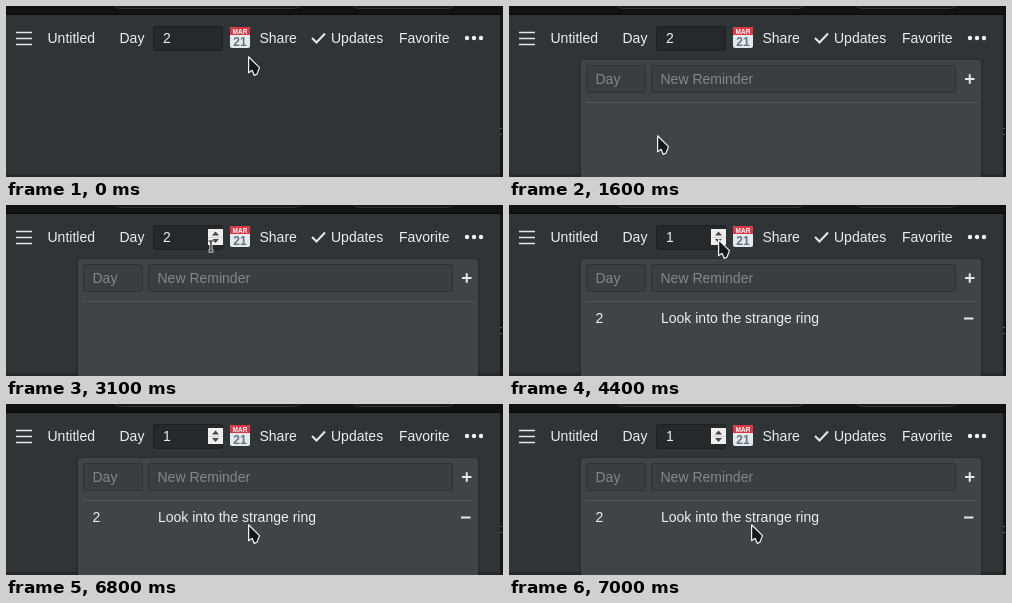
Write an HTML page that moves like this. It is 497 by 171 pixels and loops after 7100 ms.

```html
<!DOCTYPE html>
<html lang="en">
<head>
<meta charset="utf-8">
<title>Day reminders</title>
<style>
  html, body { margin: 0; width: 100%; height: 100%; overflow: hidden; background: #2f3437; }
  svg { display: block; width: 497px; height: 171px; }
  text { font: 14px "Liberation Sans", Arial, sans-serif; fill: #ecedee; white-space: pre; }
  .hint { fill: #83878a; }
  .mono text { font: 14px "Noto Sans Mono", "DejaVu Sans Mono", monospace; fill: #d2d2d2; }
  .mono .dot { fill: #4a4a4a; }
  .mono .em { font-style: italic; fill: #c3d6da; }
  .field { fill: #393e41; stroke: #2d3234; }
  .icon { fill: none; stroke: #e6e7e8; }
</style>
</head>
<body>
<svg viewBox="0 0 497 171">
  <g id="app">
    <rect width="497" height="171" fill="#2f3437"/>
    <rect width="497" height="9" fill="#111213"/>
    <path d="M0 8.5H497" stroke="#090a0a"/>
    <g fill="#171819" stroke="#303233">
      <rect x="106.5" y="-18" width="190" height="20.5" rx="8"/>
      <rect x="345.5" y="-18" width="104" height="20.5" rx="8"/>
    </g>
    <rect x="494" y="9" width="3" height="162" fill="#151718"/>
    <path d="M494 122.500h2M494 128.500h2" stroke="#55595b"/>
    <rect y="168" width="494" height="3" fill="#26292b"/>

    <path class="icon" d="M10 26.500H26M10 32.500H26M10 38.500H26" stroke-width="1.300"/>
    <text x="41.500" y="37">Untitled</text>
    <text x="113.500" y="37">Day</text>
    <rect x="147.500" y="20.500" width="69" height="24" rx="2" fill="#25292b" stroke="#1d2022"/>
    <text id="value" x="157" y="37">2</text>
    <rect id="caret" x="165" y="24" width="1" height="16" fill="#f2f2f2"/>
    <g id="spinner">
      <rect x="202" y="24" width="15" height="16" fill="#efefef"/>
      <rect id="pressed" x="202" y="32" width="15" height="8" fill="#c4c4c4"/>
      <path d="M206 30.500L209.500 26.500L213 30.500ZM206 34L209.500 38L213 34Z" fill="#44484a"/>
      <path d="M202 32.500H217" stroke="#d4d4d4"/>
    </g>
    <g id="calendar">
      <rect x="224" y="21" width="20" height="21" rx="2" fill="#e3e9ed"/>
      <path d="M224 29V23a2 2 0 0 1 2-2h16a2 2 0 0 1 2 2v6Z" fill="#dd3644"/>
      <text x="234" y="27.500" text-anchor="middle" style="font-size:6.500px;font-weight:bold;fill:#fff">MAR</text>
      <text x="234" y="39.500" text-anchor="middle" style="font-size:12px;font-weight:bold;fill:#66757f">21</text>
    </g>
    <text x="253.500" y="37">Share</text>
    <path class="icon" d="M306 32L310.500 36.500L319 27.500" stroke-width="2"/>
    <text x="325" y="37">Updates</text>
    <text x="393" y="37">Favorite</text>
    <g fill="#f0f0f0">
      <circle cx="461" cy="32" r="2.200"/><circle cx="468" cy="32" r="2.200"/><circle cx="475" cy="32" r="2.200"/>
    </g>

    <g id="panel">
      <rect x="70" y="53" width="404" height="130" rx="4" fill="#000" opacity=".12"/>
      <rect x="72" y="54" width="400" height="130" rx="3" fill="#3f4447"/>
      <rect class="field" x="77.500" y="59.500" width="59" height="27" rx="2"/>
      <rect class="field" x="142.500" y="59.500" width="304" height="27" rx="2"/>
      <text class="hint" x="86.500" y="78">Day</text>
      <text class="hint" x="151.500" y="78">New Reminder</text>
      <path class="icon" d="M456 73H465.500M460.750 68.250V77.750" stroke-width="2"/>
      <path d="M77 96.500H468" stroke="#505558"/>
      <g id="reminder">
        <text x="86.500" y="118">2</text>
        <text x="152" y="118">Look into the strange ring</text>
        <path class="icon" d="M455 113.500H464.500" stroke-width="2"/>
      </g>
    </g>
  </g>

  <g id="page">
    <rect width="497" height="171" fill="#1f1f1f"/>
    <rect y="18" width="497" height="4" fill="#171717"/>
    <g id="prose" class="mono"></g>
    <rect x="144" y="87" width="200" height="84" fill="#3f4447"/>
    <path d="M144 96.500H344" stroke="#505558"/>
    <text x="152" y="118">Look into the strange ring</text>
  </g>

  <g id="arrow">
    <path d="M.6 .8V16.700L4.100 14.300L6.300 19.400L8.900 18.300L11.500 11.600Z" fill="#15181a" stroke="#f4f4f4" stroke-width="1.200" stroke-linejoin="round"/>
  </g>
  <g id="beam" fill="none">
    <path d="M-2.500 -5H2.500M0 -5V5M-2.500 5H2.500" stroke="#f4f4f4" stroke-width="3"/>
    <path d="M-2.500 -5H2.500M0 -5V5M-2.500 5H2.500" stroke="#111" stroke-width="1.200"/>
  </g>
</svg>
<script>
const LOOP = 7100, STEP = 100;
const $ = id => document.getElementById(id);
const show = (id, on) => $(id).setAttribute("visibility", on ? "visible" : "hidden");

// Pointer stops: time, x, y
const stops = [
  [300, 242, 50], [600, 233, 32], [1000, 233, 32], [1600, 148, 129], [1800, 130, 123],
  [2300, 234, 52], [2600, 203, 42], [2800, 194, 32], [3100, 205, 41],
  [3400, 207, 36], [3600, 209, 34], [4900, 209, 34], [5300, 82, 117], [5600, 242, 120]
];

function pointerAt(t) {
  const next = stops.findIndex(s => s[0] >= t);
  if (next < 0) return stops[stops.length - 1].slice(1);
  if (next === 0) return stops[0].slice(1);
  const a = stops[next - 1], b = stops[next];
  const k = (t - a[0]) / (b[0] - a[0]);
  return [a[1] + (b[1] - a[1]) * k, a[2] + (b[2] - a[2]) * k];
}

const inside = ([x, y], x0, y0, x1, y1) => x >= x0 && x < x1 && y >= y0 && y < y1;

// Monospace text with a faint dot for every space
function addProse(col, y, str, cls) {
  const x = -1.8 + col * 8.4;
  const add = (value, name) => {
    const el = document.createElementNS("http://www.w3.org/2000/svg", "text");
    el.setAttribute("x", x);
    el.setAttribute("y", y);
    if (name) el.setAttribute("class", name);
    el.textContent = value;
    $("prose").append(el);
  };
  add(str.replace(/ /g, "\u00a0"), cls);
  add(str.replace(/[^ ]/g, "\u00a0").replace(/ /g, "·"), "dot");
}
addProse(0, 129, "at you ");
addProse(7, 129, "_really_", "em");
addProse(15, 129, " l");
addProse(0, 148, " a renamed worksp");
addProse(0, 167, "y the extension.");
addProse(41, 129, "s before you creat");
addProse(41, 148, "e a new workspace.");

function draw(time) {
  const t = Math.floor((time % LOOP) / STEP) * STEP;
  const pos = pointerAt(t).map(Math.round);
  const overInput = inside(pos, 147, 20, 217, 45);
  const overSpinner = inside(pos, 202, 24, 217, 40);
  const beam = overInput && !overSpinner;
  const edited = t >= 3800;
  const away = t === 6900;

  show("app", !away);
  $("app").style.display = away ? "none" : "";
  $("page").style.display = away ? "" : "none";
  show("panel", t >= 1100);
  show("reminder", t >= 4400);
  show("spinner", overInput || edited);
  show("pressed", t >= 3800 && t < 4000);
  show("caret", edited && Math.floor((t - 3800) / 600) % 2 === 0);
  $("value").textContent = edited ? "1" : "2";
  $("calendar").setAttribute("opacity", inside(pos, 224, 21, 244, 42) ? 0.8 : 1);

  for (const id of ["arrow", "beam"]) $(id).setAttribute("transform", `translate(${pos})`);
  show("arrow", !beam);
  show("beam", beam);
}

const start = performance.now();
function tick() {
  draw(performance.now() - start);
  requestAnimationFrame(tick);
}
tick();
</script>
</body>
</html>
```
